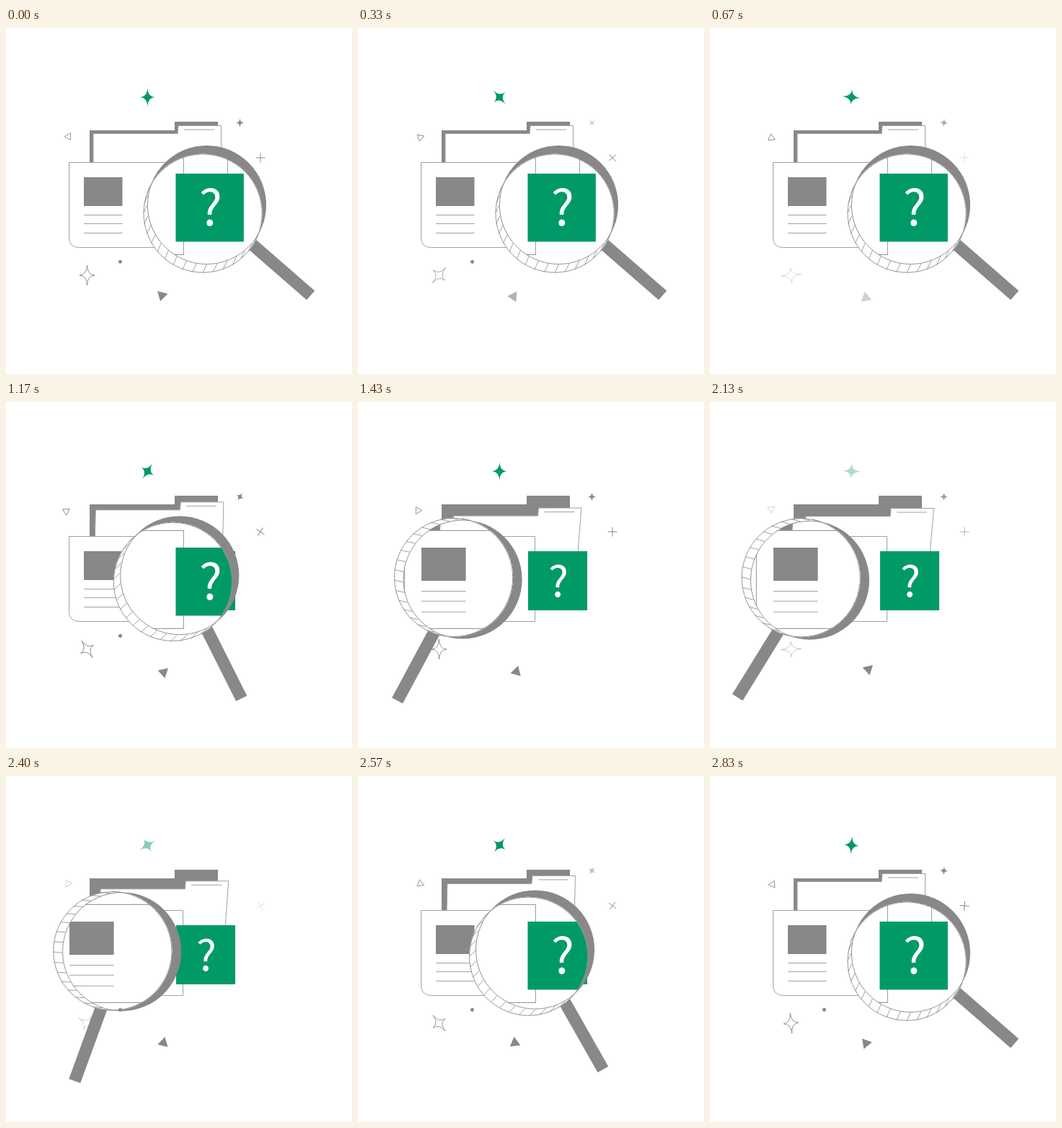
An HTML page with a canvas for the animation above (2.87 s loop, 480 px wide and 480 px high).

```html
<!DOCTYPE html>
<html lang="en">
<head>
<meta charset="utf-8">
<title>Searching files</title>
<style>
  html, body { margin: 0; width: 100%; height: 100%; overflow: hidden; background: #fff; }
  canvas { display: block; width: 480px; height: 480px; }
</style>
</head>
<body>
<canvas id="stage" width="480" height="480"></canvas>
<script>
const ctx = document.getElementById('stage').getContext('2d');
const LOOP = 2870, TAU = Math.PI * 2, RAD = Math.PI / 180;
const GRAY = '#888888', LINE = '#a0a0a0', GREEN = '#009a69', WHITE = '#ffffff';
const RADIUS = 82.5, RIM = 12.8, ZOOM = 1.152;

// Ease curve with control points (.33, 0) and (.33, 1)
function ease(x) {
  if (x <= 0) return 0;
  if (x >= 1) return 1;
  let lo = 0, hi = 1;
  for (let i = 0; i < 24; i++) {
    const s = (lo + hi) / 2, r = 1 - s;
    if (0.99 * r * s + s * s * s < x) lo = s; else hi = s;
  }
  return lo * lo * (3 - 2 * lo);
}

// 0: lens over the green card, 1: lens over the page
function slide(t) {
  return t < 2000 ? ease((t - 1037) / 505) : 1 - ease((t - 2303) / 505);
}

function poly(points, close = true) {
  ctx.beginPath();
  points.forEach(([x, y]) => ctx.lineTo(x, y));
  if (close) ctx.closePath();
}

function fill(color) { ctx.fillStyle = color; ctx.fill(); }

function stroke(color, width = 1) {
  ctx.strokeStyle = color;
  ctx.lineWidth = width;
  ctx.stroke();
}

function rect(x, y, w, h, color) {
  ctx.fillStyle = color;
  ctx.fillRect(x, y, w, h);
}

function hline(x1, x2, y) {
  poly([[x1, y], [x2, y]], false);
  stroke(LINE);
}

function circle(x, y, r) {
  ctx.beginPath();
  ctx.arc(x, y, r, 0, TAU);
}

function questionMark(cx, cy, height) {
  const face = size => '500 ' + size +
    'px "Noto Sans CJK SC", "Noto Sans CJK JP", "Open Sans", sans-serif';
  ctx.textAlign = 'left';
  ctx.textBaseline = 'alphabetic';
  ctx.font = face(100);
  let m = ctx.measureText('?');
  const size = 100 * height / (m.actualBoundingBoxAscent + m.actualBoundingBoxDescent);
  ctx.font = face(size);
  m = ctx.measureText('?');
  const x = cx - (m.actualBoundingBoxRight - m.actualBoundingBoxLeft) / 2;
  const y = cy + (m.actualBoundingBoxAscent - m.actualBoundingBoxDescent) / 2;
  ctx.fillStyle = WHITE;
  ctx.fillText('?', x, y);
}

function scene(p) {
  const d = 12 * p;

  // Folder back
  poly([[116, 142], [234, 142], [234, 130], [294, 130], [294, 288], [116, 288]]);
  fill(GRAY);

  // Sheet leaning forward
  poly([[121, 288], [121 + d, 146.5 + d], [238 + d, 146.5 + d], [239 + d, 135.5 + d],
        [298.5 + d, 135.5 + d], [298.5, 288]]);
  fill(WHITE);
  stroke(LINE);
  hline(247 + d, 289 + d, 141 + d);

  // Page
  ctx.beginPath();
  ctx.moveTo(87.5, 186.5);
  ctx.lineTo(245.5, 186.5);
  ctx.lineTo(245.5, 304.5);
  ctx.lineTo(102, 304.5);
  ctx.quadraticCurveTo(87.5, 304.5, 87.5, 290);
  ctx.closePath();
  fill(WHITE);
  stroke(LINE);
  rect(108, 207, 53.5, 40, GRAY);
  for (const y of [259.5, 271.5, 284.5]) hline(108, 161.5, y);

  // Card
  rect(236, 207, 82, 82, GREEN);
  questionMark(277.5, 247.6, 46);
}

function magnifier(p) {
  const turn = 80.7 * p * RAD;
  const ax = 278.5 - 140 * p + 18 * p * p * (1 - p);
  const ay = 245.5 - 25 * p + 26.7 * p * p;
  const tilt = -65 * RAD + turn;
  const dx = RIM * Math.cos(tilt), dy = RIM * Math.sin(tilt);
  const bx = ax - dx, by = ay - dy;

  ctx.save();
  ctx.translate(ax, ay);
  ctx.rotate(41 * RAD + turn);
  rect(76, -8.5, 115, 17, GRAY);
  ctx.restore();

  circle(ax, ay, RADIUS);
  fill(GRAY);
  circle(bx, by, RADIUS);
  fill(WHITE);

  // Notches on the rim
  for (let a = 95; a < 270; a += 10) {
    const x = bx + RADIUS * Math.cos(tilt + a * RAD);
    const y = by + RADIUS * Math.sin(tilt + a * RAD);
    poly([[x, y], [x + dx, y + dy]], false);
    stroke(LINE);
  }

  ctx.save();
  circle(bx, by, RADIUS);
  ctx.clip();
  ctx.save();
  circle(ax, ay, RADIUS);
  ctx.clip();
  rect(0, 0, 480, 480, WHITE);
  ctx.translate(63.8 - 87 * ZOOM, 177.8 - 186 * ZOOM);
  ctx.scale(ZOOM, ZOOM);
  scene(p);
  ctx.restore();
  circle(ax, ay, RADIUS - 0.4);
  stroke(GRAY, 0.9);
  ctx.restore();

  circle(bx, by, RADIUS - 0.4);
  stroke(GRAY, 0.9);
}

function star(long, wide) {
  const tips = [[0, -long], [wide, 0], [0, long], [-wide, 0]];
  const k = 0.03;
  ctx.beginPath();
  ctx.moveTo(0, -long);
  for (let i = 0; i < 4; i++) {
    const a = tips[i], b = tips[(i + 1) % 4];
    ctx.quadraticCurveTo((a[0] + b[0]) * k, (a[1] + b[1]) * k, b[0], b[1]);
  }
  ctx.closePath();
}

function triangle(x, y, r, deg) {
  poly([0, 120, 240].map(a => {
    const q = (deg + a) * RAD;
    return [x + r * Math.cos(q), y + r * Math.sin(q)];
  }));
}

// Each blink is a short dip to nothing centred on the given time
const SPARKS = [
  { x: 196.3, y: 96, dir: -1, blinks: [2240],
    draw() { star(13.5, 11); fill(GREEN); } },
  { x: 324.5, y: 131.5, dir: -1, blinks: [440, 2400],
    draw() { star(6.5, 6); fill(GRAY); } },
  { x: 353, y: 180, dir: -1, blinks: [585, 2330],
    draw() {
      poly([[-6.5, 0], [6.5, 0]], false); stroke(GRAY);
      poly([[0, -6.5], [0, 6.5]], false); stroke(GRAY);
    } },
  { x: 85, y: 150.5, dir: 1, blinks: [2270],
    draw() { triangle(1.8, 0, 5.6, 60); stroke(GRAY, 0.9); } },
  { x: 112.5, y: 343, dir: 1, blinks: [570, 2290],
    draw() { star(14, 10.5); ctx.lineJoin = 'round'; stroke(GRAY, 0.9); } },
  { x: 158.5, y: 324.3, dir: 1, blinks: [670],
    draw() { circle(0, 0, 2.5); fill(GRAY); } },
  { x: 218, y: 372.5, dir: -1, blinks: [540],
    draw() { triangle(-1.8, -1.6, 8.5, 105); fill(GRAY); } }
];

function sparkles(t) {
  for (const s of SPARKS) {
    ctx.save();
    ctx.globalAlpha = Math.min(1, ...s.blinks.map(c => Math.abs(t - c) / 330));
    ctx.translate(s.x, s.y);
    ctx.rotate(s.dir * TAU * t / LOOP);
    s.draw();
    ctx.restore();
  }
}

const start = performance.now();

function frame() {
  const t = (performance.now() - start) % LOOP;
  const p = slide(t);
  rect(0, 0, 480, 480, WHITE);
  scene(p);
  magnifier(p);
  sparkles(t);
  requestAnimationFrame(frame);
}
frame();
</script>
</body>
</html>
```
